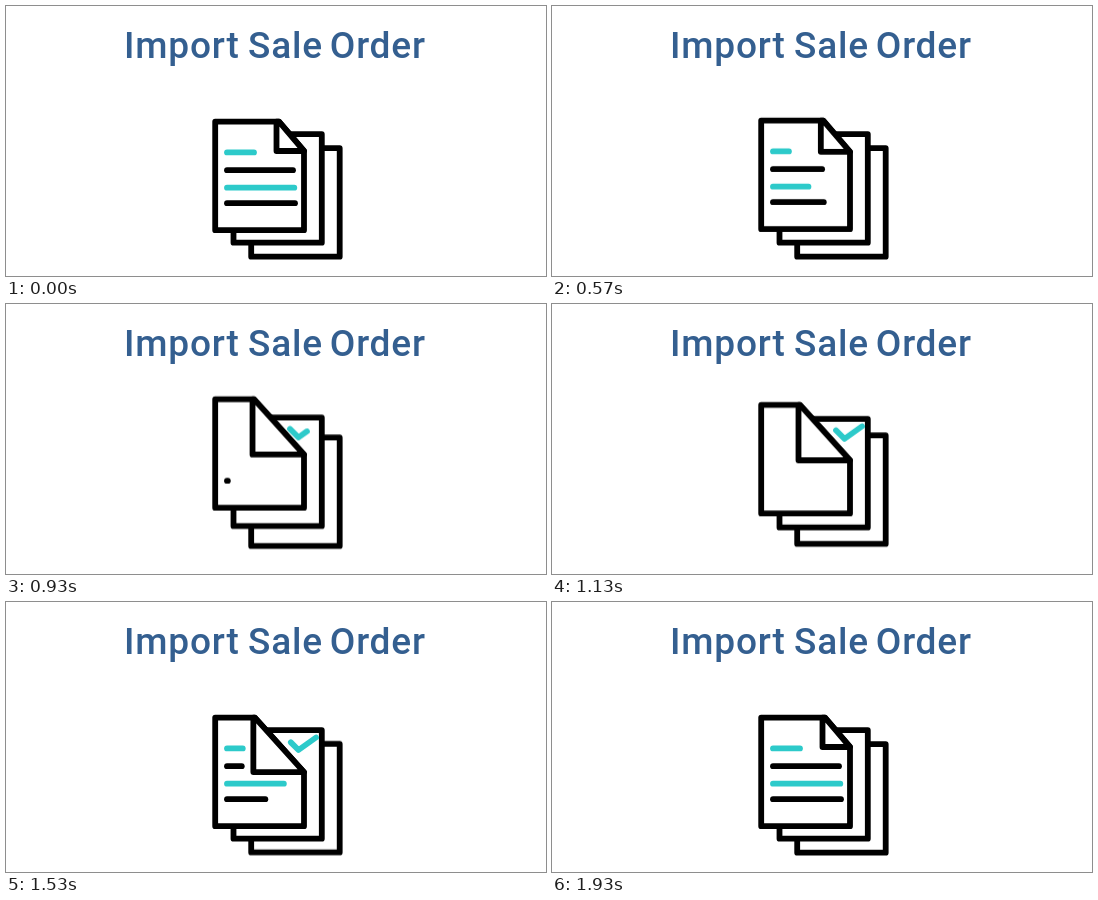
Animation of 540x270 px, one loop 2.5 s. Source, as an HTML page without scripts:

```html
<!DOCTYPE html>
<html lang="en">
<head>
<meta charset="utf-8">
<title>Import Sale Order</title>
<style>
html, body { margin: 0; width: 100%; height: 100%; overflow: hidden; background: #fff; }
svg { display: block; width: 540px; height: 270px; }
text { font: 500 37px Roboto, "Open Sans", sans-serif; letter-spacing: .8px; fill: #345f90; }

.page { fill: #fff; stroke: #000; stroke-width: 5.8; stroke-linejoin: round; }
.line, .check { fill: none; stroke: #000; stroke-width: 5.8; stroke-linecap: round; stroke-linejoin: round; stroke-dasharray: 100 200; }
.teal { stroke: #2dcaca; }

.back, .mid, .front, .sheet, .fold, .line, .check {
  animation: 2.5s cubic-bezier(.333, 0, .667, 1) infinite;
}
.back { animation-name: back; }
.mid { animation-name: mid; }
.front { animation-name: front; }
.sheet { animation-name: sheet; }
.fold { animation-name: fold; }
.check { animation-name: check; }
.l1 { animation-name: l1; }
.l2 { animation-name: l2; }
.l3 { animation-name: l3; }
.l4 { animation-name: l4; }

/* pages hop one after the other */
@keyframes front {
  0%, 20.4%, 57.2%, 100% { transform: translateY(0); }
  38%, 38.8% { transform: translateY(-20.5px); }
}
@keyframes mid {
  0%, 23.6%, 60.4%, 100% { transform: translateY(0); }
  40% { transform: translateY(-15.8px); }
}
@keyframes back {
  0%, 25.6%, 63.2%, 100% { transform: translateY(0); }
  42.4%, 42.8% { transform: translateY(-11.2px); }
}

/* the corner opens and closes */
@keyframes sheet {
  0%, 20%, 77.2%, 100% { d: path("M209.2 115.6L273 115.6L298 145L298 224.2L209.2 224.2Z"); }
  37.6%, 59.2% { d: path("M209.2 115.6L248 115.6L298 171L298 224.2L209.2 224.2Z"); }
}
@keyframes fold {
  0%, 20%, 77.2%, 100% { d: path("M270.5 115.6L273 115.6L298 145L270.5 145Z"); }
  37.6%, 59.2% { d: path("M246.5 115.6L248 115.6L298 171L246.5 171Z"); }
}

/* strokes: 0 is drawn, 101 and -101 are hidden */
@keyframes check {
  0%, 26.4% { stroke-dashoffset: 101; }
  44%, 59.2% { stroke-dashoffset: 0; }
  77.2%, 100% { stroke-dashoffset: -101; }
}
@keyframes l1 {
  0%, 12%, 72%, 100% { stroke-dashoffset: 0; }
  36.8%, 47.6% { stroke-dashoffset: 101; }
}
@keyframes l2 {
  0%, 16%, 72.8%, 100% { stroke-dashoffset: 0; }
  36.8%, 56% { stroke-dashoffset: 101; }
}
@keyframes l3 {
  0%, 10%, 65.2%, 100% { stroke-dashoffset: 0; }
  36.8%, 49.2% { stroke-dashoffset: 101; }
}
@keyframes l4 {
  0%, 14.8%, 67.6%, 100% { stroke-dashoffset: 0; }
  39.4%, 53.6% { stroke-dashoffset: 101; }
}
</style>
</head>
<body>
<svg viewBox="0 0 540 270">
  <text y="52.2"><tspan x="118">Import</tspan> <tspan x="242">Sale</tspan> <tspan x="323.8">Order</tspan></text>

  <path class="page back" d="M245.2 142.2H333.7V250.7H245.2Z"/>
  <g class="mid">
    <path class="page" d="M227.5 128.2H315.8V236.7H227.5Z"/>
    <path class="check teal" pathLength="100" d="M284 139.5L292.5 148L310 135.5"/>
  </g>
  <g class="front">
    <path class="page sheet" d="M209.2 115.6L273 115.6L298 145L298 224.2L209.2 224.2Z"/>
    <path class="line teal l1" pathLength="100" d="M221 146.4H248"/>
    <path class="line l2" pathLength="100" d="M221 164.2H287"/>
    <path class="line teal l3" pathLength="100" d="M221 181.7H288.3"/>
    <path class="line l4" pathLength="100" d="M221 197.2H289"/>
    <path class="page fold" d="M270.5 115.6L273 115.6L298 145L270.5 145Z"/>
  </g>
</svg>
</body>
</html>
```
